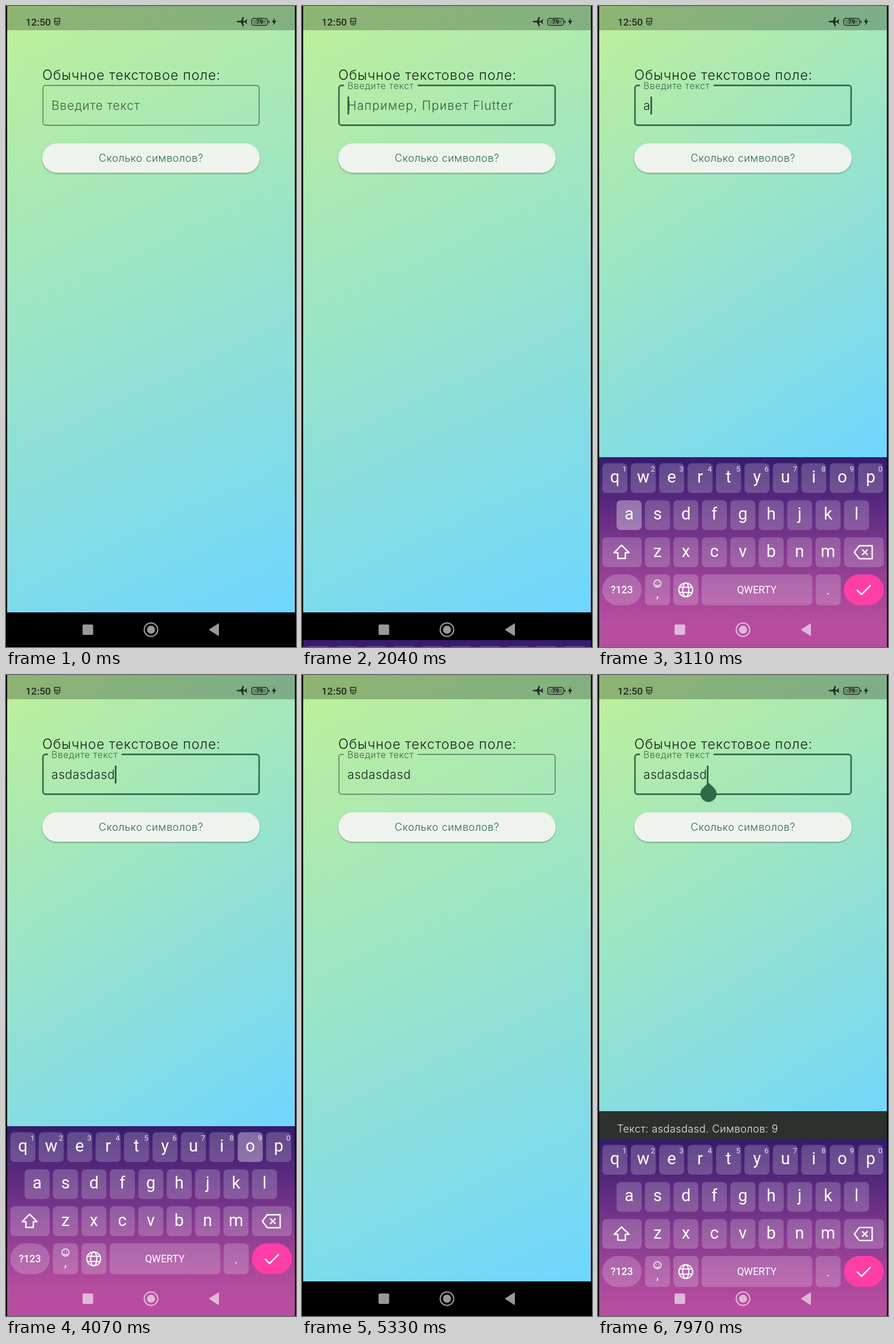
An HTML page that plays this animation: 504x1111 px, repeating every 8000 ms.

```html
<!DOCTYPE html>
<html lang="ru">
<head>
<meta charset="utf-8">
<title>Текстовое поле</title>
<style>
@property --drop { syntax: "<length>"; inherits: true; initial-value: 329px; }
@property --inset { syntax: "<length>"; inherits: true; initial-value: 329px; }

html, body { margin: 0; width: 504px; height: 1111px; overflow: hidden; background: #000; }
body {
  position: relative;
  font-family: Inter, Roboto, sans-serif;
  font-weight: 350;
  --green: #2d6a4a;
  --bottom: min(1051px, 782px + var(--inset));
  animation: keyboard 8s infinite, resize 8s infinite;
}
svg { position: absolute; inset: 0; }

#page {
  position: absolute; left: 2px; top: 0; width: 500px; height: var(--bottom);
  overflow: hidden;
  background: linear-gradient(calc(90deg + atan2(var(--bottom), 500px)), #bff098, #6fd6ff);
}
#snack {
  position: absolute; left: 0; bottom: 0; width: 100%; height: 0; overflow: hidden;
  background: #2d312e; color: #e6ece6;
  font-size: 18.2px; line-height: 60px; letter-spacing: .32px; text-indent: 31px; white-space: nowrap;
  animation: rise 8s infinite;
}
#snack span { animation: reveal 8s infinite; }

#input {
  position: absolute; left: 79px; top: 157px; height: 31px; line-height: 31px;
  display: flex; font-size: 21px; color: #18211b;
}
#input span { font-size: 0; letter-spacing: .028em; }
#caret { width: 2.6px; height: 31px; background: var(--green); animation: caret 8s step-end infinite; }
#handle {
  position: absolute; left: 178px; top: 192px; width: 28px; height: 28px;
  background: var(--green); border-radius: 0 50% 50% 50%; transform: rotate(45deg);
  animation: handle 8s step-end infinite;
}
#button {
  position: absolute; left: 63px; top: 238px; width: 378px; height: 51px;
  border-radius: 26px; overflow: hidden; background: #eef3ee;
}
#shade { position: absolute; left: 63px; top: 238px; width: 378px; height: 51px; border-radius: 26px; box-shadow: 0 1.5px 2.5px #0005; }
#ripple {
  position: absolute; left: -11px; top: -174px; width: 400px; height: 400px;
  border-radius: 50%; background: var(--green); opacity: 0;
  animation: ripple 8s infinite;
}

#field { color: #46594c; stroke-width: 1.2px; animation: focus 8s infinite; }
#field path { fill: none; stroke: currentColor; }
#gap { transform-origin: 201px 137px; animation: gap 8s infinite; }
#label { fill: currentColor; stroke: none; font-size: 21px; letter-spacing: .9px; transform-origin: 79px 180px; animation: float 8s infinite; }
#hint { font-size: 21px; letter-spacing: 1.26px; fill: #3f5347; animation: hint 8s infinite; }

#keyboard { transform: translateY(var(--drop)); font-family: Roboto, sans-serif; font-weight: 400; fill: #fff; text-anchor: middle; }
#keyboard text { font-size: 29px; }
#keyboard .small { font-size: 13px; opacity: .85; }
#keyboard .word { font-size: 17.5px; }
#keyboard .mark { font-size: 22px; }
.icon { fill: none; stroke: #fff; stroke-width: 2.4; stroke-linejoin: round; }

@keyframes keyboard {
  0%, 25.0875% { --drop: 329px; animation-timing-function: cubic-bezier(.4, 0, .2, 1); }
  28.7375%, 59.5% { --drop: 0px; animation-timing-function: cubic-bezier(.4, 0, .2, 1); }
  63.15% { --drop: 329px; }
  97.125% { --drop: 329px; animation-timing-function: cubic-bezier(.457, 0, .297, .833); }
  100% { --drop: 9.2px; }
}
/* The page follows the keyboard slightly late while it opens. */
@keyframes resize {
  0%, 25.325% { --inset: 329px; animation-timing-function: cubic-bezier(.4, 0, .2, 1); }
  28.975%, 59.5% { --inset: 0px; animation-timing-function: cubic-bezier(.4, 0, .2, 1); }
  63.15% { --inset: 329px; }
  97.3625% { --inset: 329px; animation-timing-function: cubic-bezier(.477, 0, .337, .784); }
  100% { --inset: 17.1px; }
}
@keyframes focus {
  0%, 21.25% { color: #46594c; stroke-width: 1.2px; }
  23.375%, 57.5% { color: #2d6a4a; stroke-width: 2.6px; }
  59.6%, 93.75% { color: #46594c; stroke-width: 1.2px; }
  95.875%, 100% { color: #2d6a4a; stroke-width: 2.6px; }
}
@keyframes gap {
  0%, 21.25% { transform: none; }
  23.375%, 100% { transform: scaleX(0); }
}
@keyframes float {
  0%, 21.25% { transform: none; animation-timing-function: cubic-bezier(.4, 0, .2, 1); }
  23.375%, 100% { transform: translateY(-36.5px) scale(.75); }
}
@keyframes hint {
  0%, 21.25% { opacity: 0; }
  23.375%, 38.87% { opacity: 1; }
  38.875%, 100% { opacity: 0; }
}
@keyframes caret {
  0%, 33.125%, 57.5% { opacity: 0; }
  21.25%, 38.875%, 93.9%, 100% { opacity: 1; }
}
@keyframes handle {
  0% { opacity: 0; }
  93.9%, 100% { opacity: 1; }
}
@keyframes rise {
  0%, 73.75% { height: 0; animation-timing-function: cubic-bezier(.4, 0, .2, 1); }
  76.875%, 100% { height: 61px; }
}
@keyframes reveal {
  0%, 75% { opacity: 0; }
  76.875%, 100% { opacity: 1; }
}
@keyframes ripple {
  0%, 72.375% { opacity: 0; transform: scale(.2); }
  73% { opacity: .12; }
  75.1875% { opacity: .12; transform: none; }
  79.6875%, 100% { opacity: 0; transform: none; }
}
</style>
</head>
<body>
<div id="page"><div id="snack"><span>Текст: asdasdasd. Символов: 9</span></div></div>
<div id="shade"></div>
<div id="button"><div id="ripple"></div></div>
<div id="input"><div id="caret"></div></div>

<svg width="504" height="1111" viewBox="0 0 504 1111">
  <defs>
    <linearGradient id="dusk" x2="0" y2="1">
      <stop stop-color="#351b6c"/>
      <stop offset=".25" stop-color="#592980"/>
      <stop offset=".5" stop-color="#83398f"/>
      <stop offset=".75" stop-color="#a8479b"/>
      <stop offset=".88" stop-color="#b74da0"/>
    </linearGradient>
  </defs>

  <path d="M2 0H502V42H2z" opacity=".25"/>
  <g fill="#1d2a1f">
    <text x="34" y="34" font-family="Roboto, sans-serif" font-weight="500" font-size="17.3">12:50</text>
    <g fill="none" stroke="#1d2a1f" stroke-width="1.4">
      <path d="M84.500 21.500V28a4.500 5 0 0 0 9 0V21.500zM84.500 26.500h9M87 30h4"/>
      <rect x="427" y="21.500" width="27.500" height="12" rx="3.500"/>
    </g>
    <path d="M400 27l3-1.300h5L411.500 19h2l-1.500 6.700h3.500l2-2.500h1.500l-1 3.800 1 3.800H417.500l-2-2.500H412l1.500 6.700h-2L408 28.300h-5z"/>
    <path d="M429.500 24h22.500v7h-22.500z" opacity=".3"/>
    <path d="M456 25.500h1.800v4H456zM467 20.500l-5 7.700h3.300L464 34l6-8.200h-3.600z"/>
    <text x="440.700" y="31.300" text-anchor="middle" font-family="Roboto, sans-serif" font-weight="700" font-size="10.500">79</text>
  </g>

  <text x="63" y="127.500" font-size="23.600" letter-spacing=".8" fill="#18211b">Обычное текстовое поле:</text>
  <g id="field">
    <path d="M201 137.600H435.400a4.500 4.500 0 0 1 4.500 4.500V202.100a4.500 4.500 0 0 1 -4.500 4.500H68.700a4.500 4.500 0 0 1 -4.500 -4.500V142.100a4.500 4.500 0 0 1 4.500 -4.500H73"/>
    <path id="gap" d="M73 137.600H201"/>
    <text id="label" x="79" y="180">Введите текст</text>
  </g>
  <text id="hint" x="79" y="180">Например, Привет Flutter</text>
  <text x="252" y="270" text-anchor="middle" font-size="18.200" letter-spacing=".45" fill="#2d6a4a">Сколько символов?</text>
</svg>

<div id="handle"></div>

<svg width="504" height="1111" viewBox="0 0 504 1111">
  <g id="keyboard">
    <path d="M2 782H502V1111H2z" fill="url(#dusk)"/>
    <g id="keys"></g>
    <g class="icon">
      <path d="M41 934.500L54 947.500H47.500V957.500H34.500V947.500H28z"/>
      <path d="M454 935.500H476.500V958H454L445.500 946.800zM459 942l9.500 9.500m0-9.500l-9.500 9.500"/>
      <path d="M450 1012l8 8 16-16" stroke-width="2.700"/>
      <g stroke-width="2">
        <circle cx="152.500" cy="1012" r="12"/>
        <ellipse cx="152.500" cy="1012" rx="5.300" ry="12"/>
        <path d="M142 1007.500h21m-21 9h21"/>
      </g>
      <g stroke-width="1.400">
        <circle cx="103.300" cy="1001" r="6.300"/>
        <path d="M100 1002.500a3.500 3.500 0 0 0 6.600 0M101 998.200v1.600m4.600-1.600v1.600"/>
      </g>
    </g>
  </g>
  <g fill="#fff" opacity=".6">
    <rect x="133" y="1072" width="18.500" height="18" rx="2.500"/>
    <circle cx="252" cy="1081" r="7"/>
    <circle cx="252" cy="1081" r="11.700" fill="none" stroke="#fff" stroke-width="2.200"/>
    <path d="M353 1081L369.500 1070.500V1091.500z" stroke="#fff" stroke-linejoin="round"/>
  </g>
</svg>

<script>
const LOOP = 8000, PITCH = 49.4, KEY = 43.5;
const keys = document.getElementById('keys');
const caret = document.getElementById('caret');
const caps = {};

// Hard steps through [time, value] pairs, looping.
function steps(el, prop, pairs) {
  const frames = pairs.map(([t, v]) => ({ offset: t / LOOP, [prop]: v, easing: 'step-end' }));
  frames.push({ offset: 1, [prop]: pairs.at(-1)[1] });
  el.animate(frames, { duration: LOOP, iterations: Infinity });
}

function add(tag, attrs, text = '') {
  const el = document.createElementNS('http://www.w3.org/2000/svg', tag);
  for (const name in attrs) el.setAttribute(name, attrs[name]);
  el.textContent = text;
  return keys.appendChild(el);
}

function key(x, y, width = KEY, height = 51.5, rx = 7, fill = '#fff', alpha = 0.2) {
  return add('rect', { x, y, width, height, rx, fill, 'fill-opacity': alpha });
}

function row(letters, left, top, digits = '') {
  [...letters].forEach((letter, i) => {
    const x = left + i * PITCH;
    caps[letter] = key(x, top);
    add('text', { x: x + KEY / 2, y: top + 33.5 }, letter);
    if (digits) add('text', { x: x + 38.5, y: top + 14.5, class: 'small' }, digits[i]);
  });
}

row('qwertyuiop', 7.5, 792.5, '1234567890');
row('asdfghjkl', 32.3, 856.7);
row('zxcvbnm', 81.6, 921);
key(7.5, 921, 68.5);
key(427.5, 921, 69);

key(7.5, 985, 68.5, 53.5, 26.7);
key(81.6, 985, KEY, 53.5);
key(131, 985, KEY, 53.5);
key(180, 985, 192.5, 53.5);
key(378.3, 985, KEY, 53.5);
const enter = key(427.5, 985, 69, 53.5, 26.7, '#ff3ea5', 1);
add('text', { x: 41.5, y: 1018, class: 'word', 'font-weight': 500 }, '?123');
add('text', { x: 276, y: 1018, class: 'word' }, 'QWERTY');
add('text', { x: 103.3, y: 1025, class: 'mark' }, ',');
add('text', { x: 400, y: 1020, class: 'mark' }, '.');

const typed = [3110, 3230, 3340, 3660, 3740, 3820, 3880, 3930, 3980];
const flashes = { a: [], s: [], d: [], o: [4050] };
typed.forEach((time, i) => {
  const letter = 'asd'[i % 3];
  const span = document.createElement('span');
  span.textContent = letter;
  caret.before(span);
  steps(span, 'fontSize', [[0, '0px'], [time, '21px']]);
  flashes[letter].push(time);
});

for (const letter in flashes) {
  steps(caps[letter], 'fillOpacity',
    [[0, 0.2], ...flashes[letter].flatMap(t => [[t, 0.36], [t + 70, 0.2]])]);
}
steps(enter, 'fill', [[0, '#ff3ea5'], [4490, '#ff62b5'], [4600, '#ff3ea5']]);
</script>
</body>
</html>
```
